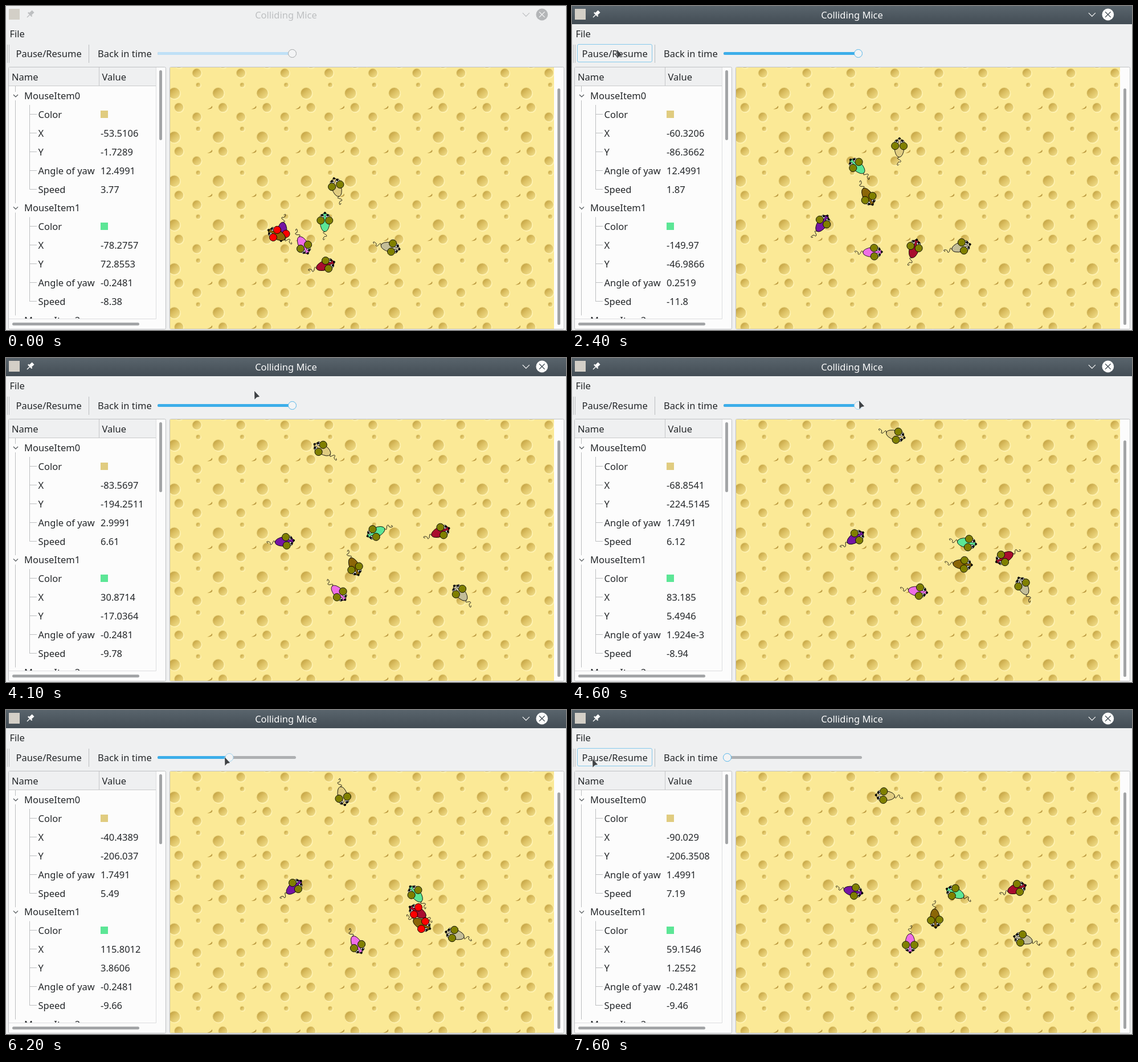
Animation, 983 px wide and 570 px high, one loop 8 s. Source, as an HTML page with a canvas:

```html
<!DOCTYPE html>
<html lang="en">
<head>
<meta charset="utf-8">
<title>Colliding Mice</title>
<style>
html, body { margin: 0; width: 100%; height: 100%; overflow: hidden; background: #eff0f1; }
canvas { display: block; }
</style>
</head>
<body>
<canvas id="stage" width="983" height="570"></canvas>
<script>
const ctx = document.getElementById('stage').getContext('2d');
const LOOP = 8000, STEP = 100;
const BLUE = '#3daee9', INK = '#232629', PANEL = '#eff0f1';
const VIEW = { x: 288, y: 108, w: 674, h: 460 };

// Simulation times of the poses below, in ms
const KEYS = [0, 1000, 1500, 2220, 2500, 2781, 3300];

const mice = [
  { color: '#e0cc80',
    x: [-53.5106, -60.3206, -60.1243, -90.029, -68.8541, -40.4463],
    y: [-1.7289, -86.3662, -161.4945, -206.3508, -224.5145, -206.0418],
    a: [-16, 1, 10, -86, 106, 166],
    yaw: [12.4991, 12.4991, 6.4991, 1.4991, 1.7491, 1.7491],
    speed: [3.77, 1.87, 5.28, 7.19, 6.12, 5.49] },
  { color: '#5ce696',
    x: [-78.2757, -149.97, -43.3441, 59.1546, 83.185, 115.7927],
    y: [72.8553, -46.9866, -58.5619, 1.2552, 5.4946, 3.861],
    a: [0, -46, 133, -65, 98, -37],
    yaw: [-.248076, .251924, -.248076, -.248076, .001924, -.248076],
    speed: [-8.38, -11.8, -10.51, -9.46, -8.94, -9.66] },
  { color: '#7515a3',
    x: [-169.7, -224.8, -182.3, -159.1, -154.2, -144.2],
    y: [92.5, 75.5, 20.4, -2.2, -5.2, -10.8],
    a: [186, 34, 43, 102, 56, 48] },
  { color: '#c3bd98',
    x: [60.9, 71.2, 208.3, 204.1, 203.3, 199.3],
    y: [126, 125.5, 141.1, 100, 98.2, 90.3],
    a: [102, 74, 36, -74, -27, -74] },
  { color: '#ee6ee6',
    x: [-124.2, -117.9, -76.8, -37.3, -21.3, -10],
    y: [121.5, 136.7, 124.5, 108.6, 109.2, 111.8],
    a: [152, 88, 37, 180, 98, 152] },
  { color: '#a90d2e',
    x: [-77.5, -28.7, 89.2, 189.8, 164.3, 119.8],
    y: [164.6, 129.5, -8, -7.9, 36.9, 42],
    a: [70, 16, 62, 70, 242, 302] },
  { color: '#8b6607',
    x: [-180.8, -127.3, -77, 15.9, 74.1, 128.1],
    y: [98.9, 17.6, 51.6, 55.4, 51.5, 68.5],
    a: [-62, 150, 106, 176, 94, 118] }
];

for (const m of mice) {
  for (const v of [m.x, m.y]) v.push(v[5] + 0.6 * (v[5] - v[4]));
  for (let i = 1; i < 6; i++) m.a[i] -= 360 * Math.round((m.a[i] - m.a[i - 1]) / 360);
}

const clamp = (v, lo, hi) => Math.min(hi, Math.max(lo, v));

function segment(keys, t) {
  let i = 0;
  while (i < keys.length - 2 && t >= keys[i + 1]) i++;
  return [i, clamp((t - keys[i]) / (keys[i + 1] - keys[i]), 0, 1)];
}

function linear(keys, v, t) {
  const [i, u] = segment(keys, t);
  const next = v[i + 1] ?? v[i];
  return v[i] + (next - v[i]) * u;
}

function smooth(v, t) {
  const [i, u] = segment(KEYS, t), d = KEYS[i + 1] - KEYS[i];
  const slope = k => {
    const a = Math.max(k - 1, 0), b = Math.min(k + 1, KEYS.length - 1);
    return (v[b] - v[a]) / (KEYS[b] - KEYS[a]) * d;
  };
  const u2 = u * u, u3 = u2 * u;
  return (2 * u3 - 3 * u2 + 1) * v[i] + (u3 - 2 * u2 + u) * slope(i) +
    (3 * u2 - 2 * u3) * v[i + 1] + (u3 - u2) * slope(i + 1);
}

const PATH_T = [700, 1100, 2200, 2400, 3100, 3200, 3600, 4000, 4100, 4600, 5400, 6200, 7000, 7600];
const PATH_X = [1, 76, 76, 79, 79, 112, 313, 418, 436, 504, 507, 384, 264, 36];
const PATH_Y = [36, 79, 79, 77, 77, 74, 66, 59, 58, 75, 79, 83, 83, 86];
const KNOB_T = [5400, 6200, 7000], KNOB_X = [502.5, 392, 272.5];

function simTime(t, knob) {
  if (t >= 5400) return 2220 + 1080 * (knob - 272.5) / 230;
  return clamp(t - 1400, 0, 1000) + Math.max(0, t - 3100);
}

function rect(x, y, w, h, fill) {
  ctx.fillStyle = fill;
  ctx.fillRect(x, y, w, h);
}

function pill(x, y, w, h, fill, stroke, r = Math.min(w, h) / 2, c = ctx) {
  c.beginPath();
  c.roundRect(x, y, w, h, r);
  if (fill) { c.fillStyle = fill; c.fill(); }
  if (stroke) { c.strokeStyle = stroke; c.lineWidth = 1; c.stroke(); }
}

function disc(x, y, r, fill, stroke, c = ctx) {
  c.beginPath();
  c.arc(x, y, r, 0, 7);
  c.fillStyle = fill;
  c.fill();
  if (stroke) { c.strokeStyle = stroke; c.lineWidth = 1; c.stroke(); }
}

function line(points, color, width = 1) {
  ctx.beginPath();
  for (let i = 0; i < points.length; i += 2) ctx.lineTo(points[i], points[i + 1]);
  ctx.strokeStyle = color;
  ctx.lineWidth = width;
  ctx.stroke();
}

function text(s, x, mid, color = INK, align = 'left') {
  ctx.font = '16.5px "Noto Sans", sans-serif';
  ctx.textAlign = align;
  ctx.fillStyle = color;
  ctx.fillText(s, x, mid + 6);
}

function paintCheese() {
  const layer = document.createElement('canvas');
  layer.width = VIEW.w;
  layer.height = VIEW.h;
  const c = layer.getContext('2d'), P = 77.25;
  c.translate(-VIEW.x, -VIEW.y);
  c.fillStyle = '#fbe996';
  c.fillRect(VIEW.x, VIEW.y, VIEW.w, VIEW.h);

  const hole = (x, y, r) => {
    disc(x + .7, y + .8, r + .9, '#fff2b2', null, c);
    disc(x - .3, y - .3, r + .3, '#ecd780', null, c);
    const g = c.createLinearGradient(x - r * .7, y - r * .8, x + r * .7, y + r * .8);
    g.addColorStop(0, '#c4a343');
    g.addColorStop(.45, '#dcc063');
    g.addColorStop(1, '#efdb86');
    disc(x, y, r - .3, g, null, c);
  };
  const wedge = (x, y) => {
    c.beginPath();
    c.moveTo(x - 5, y + 2.5);
    c.quadraticCurveTo(x + 1, y + 1, x + 3.5, y - 3.5);
    c.quadraticCurveTo(x + 6, y + 2.5, x - 5, y + 2.5);
    c.fillStyle = '#bd9c43';
    c.fill();
  };
  for (let dx = -P; dx < 10 * P; dx += P)
    for (let dy = -P; dy < 7 * P; dy += P) {
      hole(295.5 + dx, 153.5 + dy, 9.8);
      hole(335 + dx, 118 + dy, 7.8);
      hole(337.5 + dx, 139 + dy, 3.8);
      hole(303.5 + dx, 178.5 + dy, 7.8);
      wedge(281 + dx, 179 + dy);
    }
  return layer;
}
const cheese = paintCheese();

function drawMouse(p) {
  ctx.save();
  ctx.translate(p.x, p.y);
  ctx.rotate(p.a * Math.PI / 180);
  ctx.beginPath();
  ctx.ellipse(0, 0, 10, 20, 0, 0, 7);
  ctx.fillStyle = p.color;
  ctx.fill();
  ctx.strokeStyle = '#000';
  ctx.lineWidth = 1;
  ctx.stroke();
  disc(-6, -13, 4, '#fff', '#000');
  disc(6, -13, 4, '#fff', '#000');
  disc(0, -20, 2, '#000', '#000');
  disc(-6, -15, 2, '#000', '#000');
  disc(6, -15, 2, '#000', '#000');
  const ear = p.hit ? '#f00' : '#808000';
  disc(-9, -4, 8, ear, '#000');
  disc(9, -4, 8, ear, '#000');
  ctx.beginPath();
  ctx.moveTo(0, 20);
  ctx.bezierCurveTo(-5, 22, -5, 22, 0, 25);
  ctx.bezierCurveTo(5, 27, 5, 32, 0, 30);
  ctx.bezierCurveTo(-5, 32, -5, 42, 0, 35);
  ctx.stroke();
  ctx.restore();
}

function drawView(tau) {
  pill(287.5, 107.5, 692, 461, '#fcfcfc', '#bfc1c3', 2);
  ctx.drawImage(cheese, VIEW.x, VIEW.y);
  const poses = mice.map(m => ({
    color: m.color, x: smooth(m.x, tau), y: smooth(m.y, tau), a: linear(KEYS, m.a, tau)
  }));
  for (const p of poses)
    p.hit = poses.some(q => q !== p && Math.hypot(p.x - q.x, p.y - q.y) < 30);
  ctx.save();
  ctx.beginPath();
  ctx.rect(VIEW.x, VIEW.y, VIEW.w, VIEW.h);
  ctx.clip();
  ctx.translate(624.2, 320.6);
  ctx.scale(.823, .823);
  poses.forEach(drawMouse);
  ctx.restore();
  pill(968, 145, 5, 416, '#a3a5a7');
}

function format(v, digits = 4) {
  return Math.abs(v) < .01 ? v.toExponential(3) : String(+v.toFixed(digits));
}

function chevron(x, y, w, h, color, width) {
  line([x - w, y - h, x, y + h, x + w, y - h], color, width);
}

function drawTree(tau) {
  pill(4.5, 107.5, 276, 461, '#fcfcfc', '#bfc1c3', 2);
  rect(5, 108, 258, 33, PANEL);
  line([5, 140.5, 263, 140.5], '#c9cbcc');
  line([163.5, 108, 163.5, 140], '#c4c6c8');
  line([263.5, 108, 263.5, 550.5, 5, 550.5], '#dcdddf');
  text('Name', 10, 125);
  text('Value', 168.5, 125);

  ctx.save();
  ctx.beginPath();
  ctx.rect(5, 141, 258, 409);
  ctx.clip();
  const row = i => 158 + i * 32.9, branch = '#bcbec0';
  line([16.5, 141, 16.5, 151], branch);
  for (let n = 0; n < 3; n++) {
    const top = row(n * 6);
    text('MouseItem' + n, 32, top);
    if (n === 2) break;
    chevron(17, top, 4, 2, '#4d5255', 1.2);
    line([16.5, top + 8, 16.5, top + 189], branch);
    line([41.5, top + 16, 41.5, row(n * 6 + 5)], branch);
    const m = mice[n];
    const yaw = linear(KEYS, m.yaw, tau), off = m.yaw[4] % .25;
    const values = ['', format(smooth(m.x, tau)), format(smooth(m.y, tau)),
      format(Math.round((yaw - off) * 4) / 4 + off), format(linear(KEYS, m.speed, tau), 2)];
    ['Color', 'X', 'Y', 'Angle of yaw', 'Speed'].forEach((label, i) => {
      const y = row(n * 6 + 1 + i);
      line([41.5, Math.round(y) - .5, 54, Math.round(y) - .5], branch);
      text(label, 56.5, y);
      if (i) text(values[i], 166, y);
      else rect(166, Math.round(y) - 7, 13, 13, m.color);
    });
  }
  ctx.restore();
  pill(269, 113, 5, 123, '#a3a5a7');
  pill(11, 557, 223, 5, '#a3a5a7');
}

function drawTitle(active) {
  if (active) {
    const g = ctx.createLinearGradient(0, 0, 0, 32);
    g.addColorStop(0, '#59646c');
    g.addColorStop(1, '#434d55');
    rect(0, 0, 983, 32, g);
  }
  const fg = active ? '#fcfcfc' : '#bdbfc1', bg = active ? '#4a545c' : PANEL;
  rect(5, 5, 19, 19, '#d3cfc7');
  text('Colliding Mice', 491.5, 15.5, fg, 'center');

  ctx.save();
  ctx.translate(43, 14);
  ctx.rotate(Math.PI / 4);
  rect(-2.8, -6.5, 5.6, 7, fg);
  rect(-4.8, 0, 9.6, 2.2, fg);
  rect(-.7, 2, 1.4, 6.5, fg);
  ctx.restore();

  chevron(912.8, 15.2, 6, 3, fg, 1.2);
  disc(940.8, 15, 10.4, active ? fg : '#b4b6b8');
  line([936, 10.2, 945.6, 19.8], bg, 1.3);
  line([945.6, 10.2, 936, 19.8], bg, 1.3);
}

function drawToolbar(t, active, knob, mx, my) {
  text('File', 6.5, 49);
  line([2.5, 68, 2.5, 100], '#bbbdbf');
  line([5.5, 68, 5.5, 100], '#bbbdbf');
  line([145.5, 68, 145.5, 100], '#bbbdbf');

  const over = t >= 700 && mx >= 9 && mx <= 141 && my >= 67 && my <= 99;
  if (t === 1400) pill(9, 67.5, 132, 31.5, '#93cee9', null, 2.5);
  else if (over) pill(9.5, 67.5, 131, 31, '#f0f2f3', '#86c9ec', 2.5);
  text('Pause/Resume', 17.5, 84);
  text('Back in time', 161, 84);

  pill(266, 81, 243, 5, '#aeb0b2');
  pill(266, 81, Math.max(5, knob - 266), 5, active ? BLUE : '#bfe0f6');
  const hot = active && Math.hypot(mx - knob, my - 83.5) < 11;
  disc(knob, 83.5, 7, '#f3f4f5', !active ? '#a2a5a7' : hot ? '#9fd3ee' : '#55b6ea');
}

function drawCursor(x, y) {
  ctx.beginPath();
  for (const [dx, dy] of [[0, 0], [.4, 15], [4.2, 11], [9.2, 10]]) ctx.lineTo(x + dx, y + dy);
  ctx.closePath();
  ctx.lineJoin = 'round';
  ctx.strokeStyle = 'rgba(250,250,250,.6)';
  ctx.lineWidth = 1.6;
  ctx.stroke();
  ctx.fillStyle = '#3f4245';
  ctx.fill();
  ctx.lineJoin = 'miter';
}

function draw(t) {
  const active = t >= 1400;
  const knob = linear(KNOB_T, KNOB_X, t);
  const mx = linear(PATH_T, PATH_X, t), my = linear(PATH_T, PATH_Y, t);
  const tau = simTime(t, knob);
  rect(0, 0, 983, 570, PANEL);
  drawTitle(active);
  drawToolbar(t, active, knob, mx, my);
  drawTree(tau);
  drawView(tau);
  if (t >= 700) drawCursor(mx, my);
}

const start = performance.now();
function tick() {
  const t = (performance.now() - start) % LOOP;
  draw(Math.floor(t / STEP) * STEP);
  requestAnimationFrame(tick);
}
tick();
</script>
</body>
</html>
```
